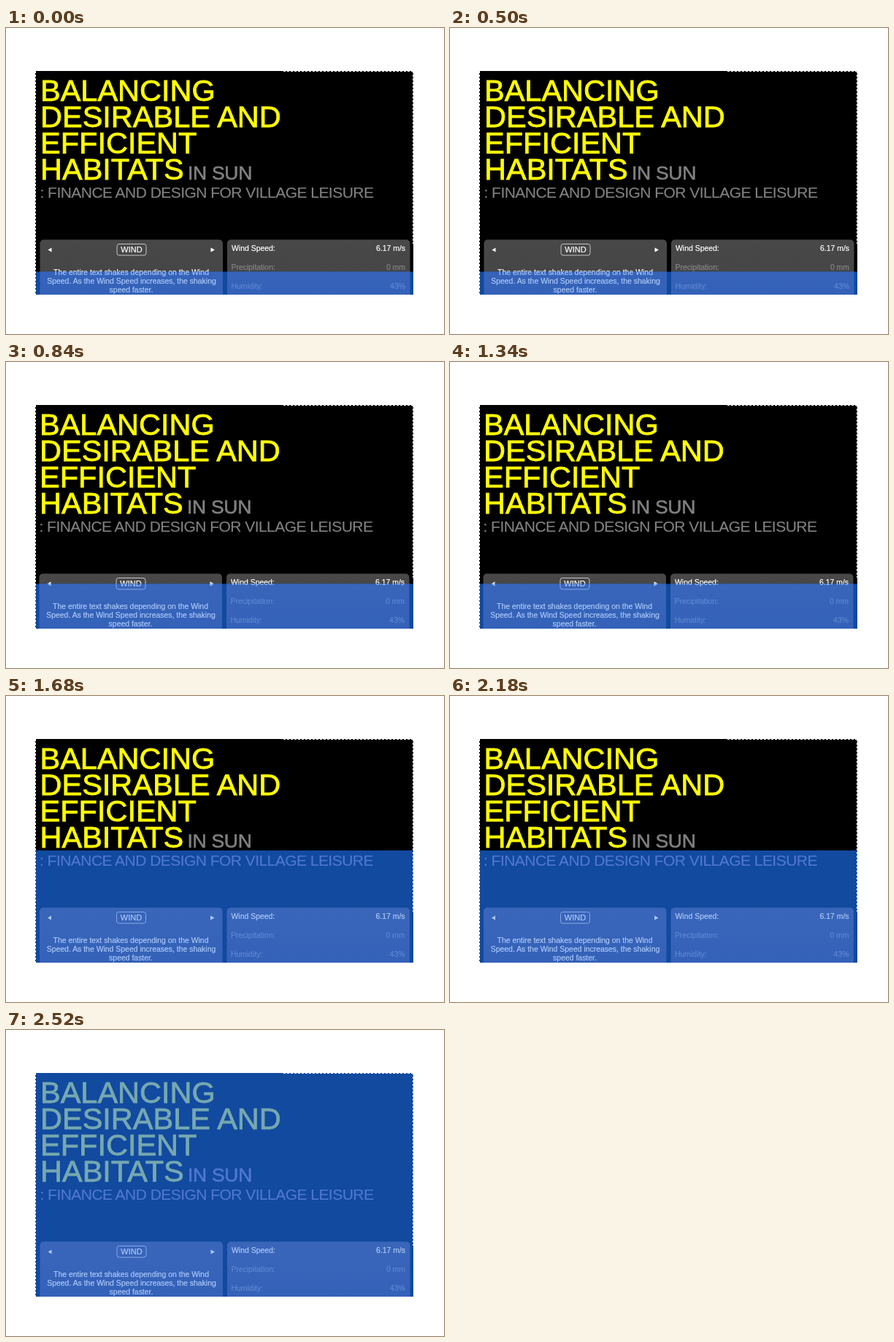
Write an HTML page that moves like this. It is 600 px wide and 420 px high and loops after 3.32 s.

```html
<!DOCTYPE html>
<html lang="en">
<head>
<meta charset="utf-8">
<title>Wind poster</title>
<style>
  html, body { margin: 0; width: 100%; height: 100%; overflow: hidden; background: #fff; }
  svg { display: block; width: 600px; height: 420px; font-family: "Liberation Sans", Arial, sans-serif; }
  .dark { --title: #ff0; --grey: #808080; --text: #fff; --dim: #858585; --line: #c4c4c4; --panel: url(#panelDark); }
  .blue { --title: #76a8b0; --grey: #5077d0; --text: #abc8f8; --dim: #5e86d2; --line: #85a7e6; --panel: url(#panelBlue); }
  .title { font-size: 41.5px; fill: var(--title); stroke: var(--title); stroke-width: .8px; }
  .place { font-size: 26.5px; letter-spacing: -.3px; fill: var(--grey); stroke: var(--grey); stroke-width: .6px; }
  .sub { font-size: 21px; letter-spacing: -.54px; fill: var(--grey); stroke: var(--grey); stroke-width: .15px; }
  .small { font-size: 10.45px; fill: var(--text); stroke: var(--text); stroke-width: .2px; }
  .small .dim { fill: var(--dim); stroke: var(--dim); }
  .mid { text-anchor: middle; }
  .end { text-anchor: end; }
  .panel { fill: var(--panel); }
  .button { fill: none; stroke: var(--line); }
  .arrow { fill: var(--text); }
  .ants { fill: none; stroke: #fff; stroke-dasharray: 3 2; shape-rendering: crispEdges; }
</style>
</head>
<body>
<svg viewBox="0 0 600 420">
  <defs>
    <linearGradient id="panelDark" x2="0" y2="1">
      <stop stop-color="#484848"/><stop offset="1" stop-color="#444"/>
    </linearGradient>
    <linearGradient id="panelBlue" x2="0" y2="1">
      <stop stop-color="#3a66ba"/><stop offset="1" stop-color="#3361b8"/>
    </linearGradient>
    <clipPath id="screen"><rect x="40" y="59" width="518" height="307"/></clipPath>
    <clipPath id="cut"><rect id="cover" x="40" y="334.5" width="518" height="307"/></clipPath>

    <g id="scene">
      <g class="title">
        <text x="47" y="100">BALANCING</text>
        <text x="47" y="136">DESIRABLE AND</text>
        <text x="47" y="172">EFFICIENT</text>
        <text x="47" y="208">HABITATS</text>
      </g>
      <text class="place" x="249" y="208">IN SUN</text>
      <text class="sub" x="46.5" y="233">: FINANCE AND DESIGN FOR VILLAGE LEISURE</text>

      <rect class="panel" x="46.5" y="290.5" width="250.5" height="90" rx="5"/>
      <rect class="panel" x="303" y="290.5" width="250.5" height="90" rx="5"/>

      <path class="arrow" d="M62.5 301.5v6l-5-3zM280.5 301.5v6l5.5-3z"/>
      <rect class="button" x="152" y="296.5" width="40" height="15.5" rx="3"/>
      <g class="small mid">
        <text x="172" y="308" font-size="11">WIND</text>
        <text x="171.5" y="338.5">The entire text shakes depending on the Wind</text>
        <text x="172" y="350.5">Speed. As the Wind Speed increases, the shaking</text>
        <text x="171.5" y="362.5">speed faster.</text>
      </g>
      <g class="small">
        <text x="309" y="306.2">Wind Speed:</text>
        <text class="dim" x="308.5" y="332.2">Precipitation:</text>
        <text class="dim" x="308.5" y="358.2">Humidity:</text>
      </g>
      <g class="small end">
        <text x="547" y="306.2">6.17 m/s</text>
        <text class="dim" x="547" y="332.2">0 mm</text>
        <text class="dim" x="547" y="358.2">43%</text>
      </g>
    </g>
  </defs>

  <g clip-path="url(#screen)">
    <rect x="40" y="59" width="518" height="307"/>
    <use class="dark shake" href="#scene"/>
    <g clip-path="url(#cut)">
      <rect x="40" y="59" width="518" height="307" fill="#114a9f"/>
      <use class="blue shake" href="#scene"/>
    </g>
    <path class="ants" d="M40.5 59V366M380 59.5H558M557.5 59V296"/>
  </g>
</svg>
<script>
  const LOOP = 3320;
  // start time, top of the blue cover, sideways shake
  const steps = [
    [0, 334.5, 0],
    [840, 304.5, -1],
    [1680, 212, -0.5],
    [2520, 59, 0]
  ];
  const cover = document.getElementById("cover");
  const shaken = document.querySelectorAll(".shake");

  function draw() {
    const t = performance.now() % LOOP;
    const [, top, dx] = steps.filter(s => s[0] <= t).pop();
    cover.setAttribute("y", top);
    shaken.forEach(el => el.setAttribute("transform", `translate(${dx} 0)`));
    requestAnimationFrame(draw);
  }
  draw();
</script>
</body>
</html>
```
